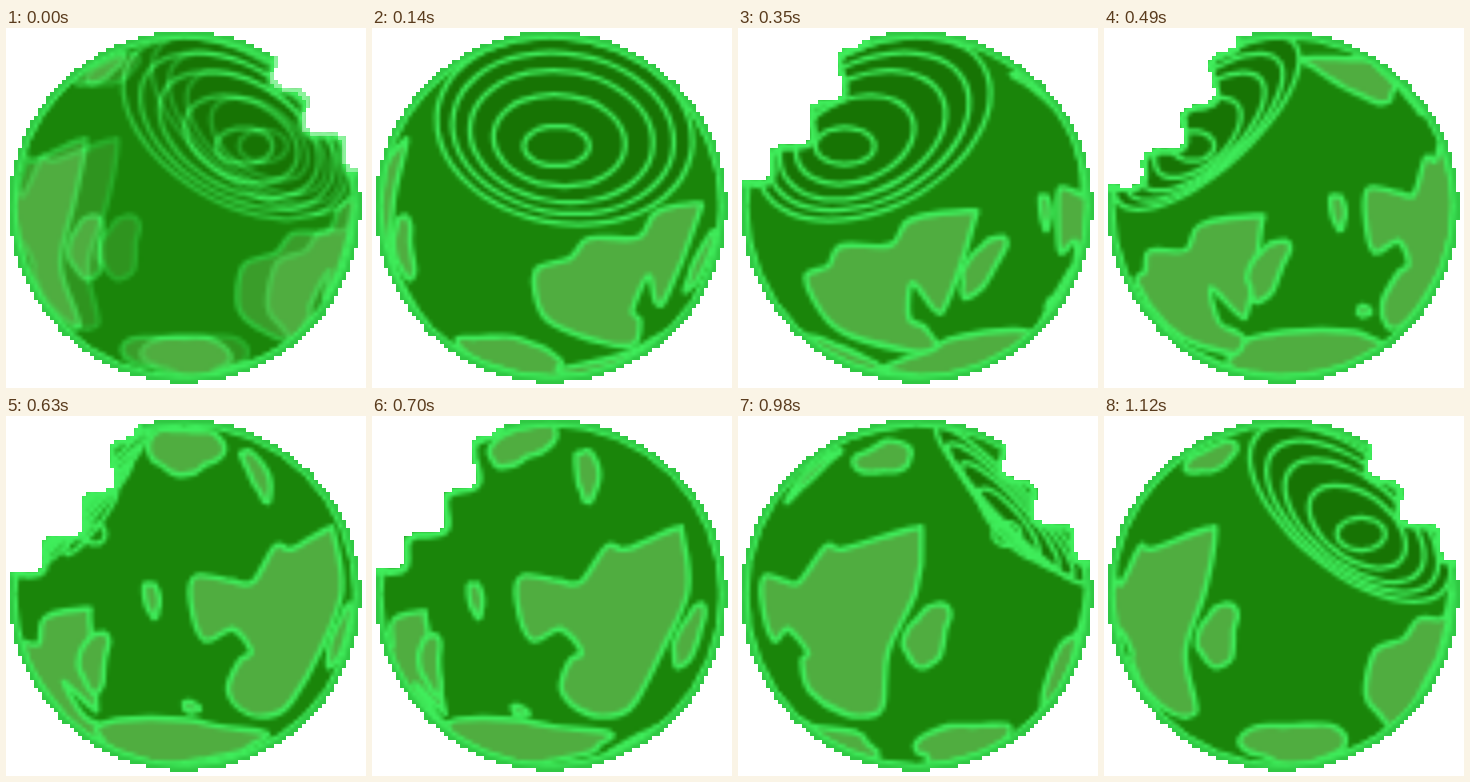
Animation of 360x360 px, one loop 1190 ms. Source, as an HTML page with a canvas:

```html
<!DOCTYPE html>
<html>
<head>
<meta charset="utf-8">
<style>
html, body { margin: 0; width: 100%; height: 100%; overflow: hidden; background: #fff }
canvas { display: block }
</style>
</head>
<body>
<canvas id="stage" width="360" height="360"></canvas>
<script>
const STEPS = 17, STEP_MS = 70, TURN = 13.4, CELL = 4;
const CX = 179, CY = 179, R = 171, EDGE = R + 4.5;
const LINE = '#40ee5c', SEA = '#1a850a', LAND = '#50ad40', PIT = '#177404', RIM = '#30c843';

const { sin, cos, PI } = Math;
const rad = deg => deg * PI / 180;
const clamp = (v, lo, hi) => Math.max(lo, Math.min(hi, v));
const mix = (a, b, t) => a + (b - a) * t;
const context = size => {
  const c = document.createElement('canvas');
  c.width = c.height = size;
  return c.getContext('2d');
};
const main = document.getElementById('stage').getContext('2d');
const g = context(360 / CELL);   // coarse drawing, enlarged softly
const view = context(360);
g.scale(1 / CELL, 1 / CELL);
g.lineJoin = g.lineCap = 'round';

// Lands are outlined as seen at step `at` and show up to `span` steps around it.
const coast = (at, text, drift = 0) =>
  ({ at, drift, speed: TURN, span: 8, outline: text.split(' ').map(p => p.split(',').map(Number)) });

const island = (at, x, y, rx, ry, { tilt = 0, speed = TURN, drift = 0, span = 8 } = {}) => {
  const outline = Array.from({ length: 14 }, (_, i) => {
    const a = i * PI / 7, k = 1 + .1 * sin(3 * a + at) + .06 * sin(5 * a);
    const u = rx * k * cos(a), v = ry * k * sin(a), t = rad(tilt);
    return [x + u * cos(t) - v * sin(t), y + u * sin(t) + v * cos(t)];
  });
  return { at, speed, drift, span, outline };
};

const lands = [
  coast(12, '73,185 78,160 110,165 130,166 160,130 180,133 245,113 255,118 255,175 225,235 208,285 195,298 160,298 125,275 125,245 135,236 112,213 88,224'),
  coast(3, '128,245 160,233 178,213 230,212 250,187 300,178 302,190 270,270 258,277 245,250 232,285 243,295 240,320 175,308 140,288', 2.5),
  island(12, 262, 220, 16, 34, { tilt: 25 }),
  island(5, 244, 238, 13, 35, { tilt: 33, speed: 15, drift: 2 }),
  island(9, 146, 183, 7, 17, { tilt: -10, speed: 15 }),
  island(7, 202, 325, 84, 22, { tilt: -5, speed: 18 }),
  island(7, 260, 283, 6, 5, { speed: 17, drift: 4 }),
  island(12, 180, 335, 52, 17, { span: 1 }),
  island(16, 190, 327, 53, 20, { speed: 15 }),
  island(9, 179, 34, 38, 22, { speed: 24, drift: -8 }),
  island(12, 134, 58, 30, 9, { tilt: -55, speed: 20 }),
  island(16, 108, 42, 28, 11, { tilt: -25, span: 2 })
];

// Closed smooth curve through all points
function curve(pts) {
  const n = pts.length, at = i => pts[(i + n) % n], path = new Path2D();
  path.moveTo(...pts[0]);
  for (let i = 0; i < n; i++) {
    const [a, b, c, d] = [at(i - 1), at(i), at(i + 1), at(i + 2)];
    path.bezierCurveTo(b[0] + (c[0] - a[0]) / 6, b[1] + (c[1] - a[1]) / 6,
      c[0] - (d[0] - b[0]) / 6, c[1] - (d[1] - b[1]) / 6, c[0], c[1]);
  }
  return path;
}

function circle(r) {
  const path = new Path2D();
  path.arc(CX, CY, r, 0, 2 * PI);
  return path;
}

function line(path, width, color = LINE) {
  g.lineWidth = width;
  g.strokeStyle = color;
  g.stroke(path);
}

function fill(path, color) {
  g.fillStyle = color;
  g.fill(path);
}

// Turn an outline around the globe's upright axis.
function turned({ outline, speed, drift }, d) {
  const width = y => Math.sqrt(Math.max(1, R * R - (y - CY) ** 2));
  return outline.map(([x, y]) => {
    const lon = Math.asin(clamp((x - CX) / width(y), -1, 1)) - rad(d * speed);
    const y2 = y + drift * d;
    return [CX + width(y2) * sin(clamp(lon, -PI / 2, PI / 2)), y2];
  });
}

// One ring of the bowl: t = 1 is its rim on the globe, t = 0 the core.
function ring(lon, t) {
  const facing = Math.max(0, cos(lon)), lat = rad(43);
  const spread = rad(30 + 19 * Math.sqrt(facing));
  const h = R * cos(spread), r = R * sin(spread);
  const coreX = CX + 90 * sin(clamp(1.4 * lon - .17, -PI / 2, PI / 2));
  return Array.from({ length: 24 }, (_, i) => {
    const a = i * PI / 12, c = cos(a), s = sin(a);
    const x = CX + h * cos(lat) * sin(lon) + r * (c * cos(lon) - s * sin(lat) * sin(lon));
    const y = CY - h * sin(lat) - r * s * cos(lat);
    return [mix(coreX + (8 + 25 * facing) * c, x, t), mix(118 - (9 + 11 * facing) * s, y, t)];
  });
}

// Bite out of the silhouette: first on the right limb (side 1), later on the left (-1).
const swell = (s, mid, half) => Math.sqrt(Math.max(0, 1 - ((s - mid) / half) ** 2));
const DIR = [cos(rad(38)), sin(rad(38))];

function biteAt(s) {
  const side = s < 19 ? 1 : -1;
  const depth = side > 0 ? 25 * swell(s, 15, 3) : 46 * swell(s, 24.5, 4.5);
  return depth && { side, reach: p => R - depth + p * p / 500 + 10 * sin(p / 9) };
}

function isOutside(x, y, bite) {
  const dx = x - CX, dy = CY - y;
  if (Math.hypot(dx, dy) > EDGE) return true;
  if (!bite) return false;
  const u = dx * bite.side, p = dy * DIR[0] - u * DIR[1];
  return u * DIR[0] + dy * DIR[1] > bite.reach(p) + 3;
}

function bitePath({ side, reach }) {
  const path = new Path2D();
  for (let p = -120; p <= 120; p += 4) {
    const q = reach(p);
    if (Math.hypot(p, q) < EDGE)
      path.lineTo(CX + side * (q * DIR[0] - p * DIR[1]), CY - q * DIR[1] - p * DIR[0]);
  }
  return path;
}

function drawScene(step) {
  const s = step < 12 ? step + STEPS : step;
  const lon = rad(50 - 13.5 * (s - 16)), bite = biteAt(s);
  g.fillStyle = SEA;
  g.fillRect(0, 0, 360, 360);
  for (const l of lands) {
    let d = (step - l.at + STEPS) % STEPS;
    if (d > STEPS / 2) d -= STEPS;
    if (Math.abs(d) > l.span) continue;
    const path = curve(turned(l, d));
    fill(path, LAND);
    line(path, 5.5);
  }
  if (Math.abs(lon) < rad(92)) {
    fill(curve(ring(lon, 1)), PIT);
    for (const t of [1, .82, .62, .35, 0]) line(curve(ring(lon, t)), 5);
  }
  line(circle(R + 6), 16, RIM);
  line(circle(R - 1), 4);
  if (bite) line(bitePath(bite), 8);

  view.drawImage(g.canvas, 0, 0, 360, 360);
  // Stepped silhouette
  for (let y = 0; y < 360; y += CELL)
    for (let x = 0; x < 360; x += CELL)
      if (isOutside(x + CELL / 2, y + CELL / 2, bite)) view.clearRect(x, y, CELL, CELL);
}

function show(step, alpha = 1) {
  view.clearRect(0, 0, 360, 360);
  drawScene(step);
  main.globalAlpha = alpha;
  main.drawImage(view.canvas, 0, 0);
}

let last = -1;
function tick() {
  const step = Math.floor(performance.now() / STEP_MS) % STEPS;
  if (step !== last) {
    last = step;
    main.clearRect(0, 0, 360, 360);
    // The loop's seam is a cross-fade of its two ends
    if (step === 0) show(STEPS - 1);
    show(step, step === 0 ? .6 : 1);
  }
  requestAnimationFrame(tick);
}
tick();
</script>
</body>
</html>
```
